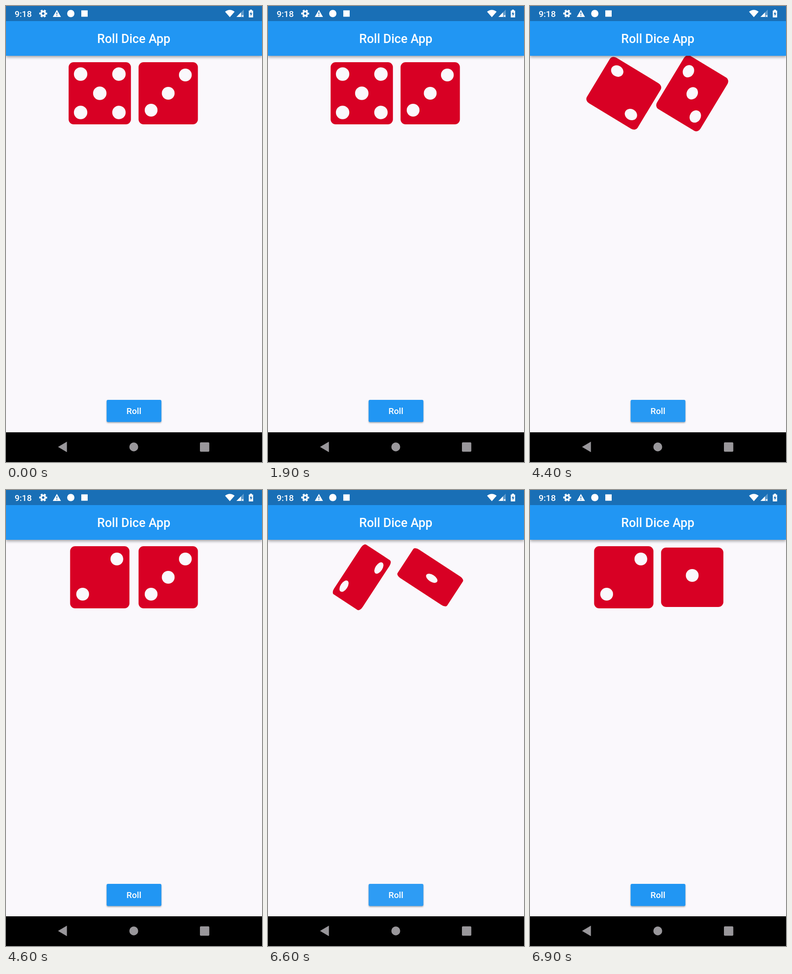
Write an HTML page that moves like this. It is 561 px wide and 998 px high and loops after 8 s.

```html
<!DOCTYPE html>
<html lang="en">
<head>
<meta charset="utf-8">
<title>Roll Dice App</title>
<style>
  html, body { margin: 0; width: 100%; height: 100%; overflow: hidden; background: #faf8fc; }
  svg { display: block; width: 561px; height: 998px; }
  text { font: 500 19px Roboto, sans-serif; fill: #fff; }
  .bar { filter: drop-shadow(0 3px 3px rgba(0, 0, 0, .35)); }
  .button { filter: drop-shadow(0 2px 1.5px rgba(0, 0, 0, .3)); }
</style>
</head>
<body>
<svg viewBox="0 0 561 998">
  <rect width="561" height="998" fill="#faf8fc"/>
  <g id="left"></g>
  <g id="right"></g>

  <rect class="bar" y="33" width="561" height="76" fill="#2196f3"/>
  <rect width="561" height="33" fill="#196fb6"/>
  <text x="280" y="81" text-anchor="middle" style="font-size:27px">Roll Dice App</text>

  <!-- status bar -->
  <text x="19" y="24">9:18</text>
  <g fill="#fff">
    <g transform="translate(81.5 16.5)">
      <circle r="4.6" fill="none" stroke="#fff" stroke-width="3.6"/>
      <circle r="7.4" fill="none" stroke="#fff" stroke-width="2.6" stroke-dasharray="4.2 3.55" stroke-dashoffset="2.1"/>
    </g>
    <path d="M111.5 8.5L120.5 24H102.5z"/>
    <path d="M111.5 13.5v5M111.5 20v2" stroke="#196fb6" stroke-width="1.8"/>
    <circle cx="142" cy="16.5" r="8"/>
    <rect x="165" y="9.5" width="14" height="14"/>
    <path d="M480 12.5Q490.500 4.500 501 12.500L490.500 24.500z"/>
    <path d="M505 24L521 8V24z" opacity=".3"/>
    <path d="M505 24L515 14V24z"/>
    <path d="M516.500 20l4 4m0-4l-4 4" stroke="#fff" stroke-width="1.300"/>
    <path d="M532 10h2.500V8h4.500v2h2.500v15H532z"/>
    <path d="M537.500 12l-3.500 6h2.300v4.500l3.500-6.500h-2.300z" fill="#196fb6"/>
  </g>

  <rect class="button" x="220.500" y="862" width="120" height="48.500" rx="3" fill="#2196f3"/>
  <rect id="press" x="220.500" y="862" width="120" height="48.500" rx="3" fill="#fff"/>
  <text x="280.300" y="893" text-anchor="middle">Roll</text>

  <!-- navigation bar -->
  <rect y="933" width="561" height="65"/>
  <g fill="#99979b">
    <path d="M114 965L133.500 953.500V976.500z"/>
    <circle cx="280" cy="965" r="9.700"/>
    <rect x="425" y="955" width="20.500" height="20.500" rx="2"/>
  </g>
</svg>
<script>
const byId = id => document.getElementById(id);
const LOOP = 8000, STEP = 100;
const diagonal = [[37.5, -40], [-37.5, 37]];
const faces = {
  1: { w: 136.5, h: 130, r: 14, pips: [[0, -4]] },
  2: { w: 130, h: 136, r: 14, pips: diagonal },
  3: { w: 130, h: 136, r: 14, pips: [...diagonal, [0, 0]] },
  5: { w: 136.5, h: 136, r: 14.7, pips: [[-42, -42], [42, -42], [0, 0], [-42, 42], [42, 42]] }
};
const rolls = [
  { start: 0, length: 0, left: 5, right: 3 },
  { start: 4224, length: 300, left: 2, right: 3 },
  { start: 6510, length: 263, left: 2, right: 1 }
];

function drawDie(id, value, x, angle, flipX, flipY) {
  const { w, h, r, pips } = faces[value];
  const die = byId(id);
  die.setAttribute('transform', `translate(${x} 191) rotate(${angle}) scale(${flipX} ${flipY})`);
  die.innerHTML = `<rect x="${-w / 2}" y="${-h / 2}" width="${w}" height="${h}" rx="11" fill="#d80024"/>` +
    pips.map(([px, py]) => `<circle cx="${px}" cy="${py}" r="${r}" fill="#faf8fc"/>`).join('');
}

function draw(now) {
  // The screen refreshes ten times a second.
  const t = Math.floor(now % LOOP / STEP) * STEP;
  const roll = rolls.findLast(({ start }) => t >= start);
  const age = t - roll.start;
  const angle = age < roll.length ? 360 * age / roll.length : 0;
  const flip = Math.cos(angle * Math.PI / 180);
  // One die tips about its horizontal axis, the other about its vertical axis.
  drawDie('left', roll.left, 205.5, angle, 1, flip);
  drawDie('right', roll.right, 355.5, angle, flip, 1);
  byId('press').setAttribute('opacity', roll.length ? Math.max(0, .09 * (1 - age / 250)) : 0);
  requestAnimationFrame(() => draw(performance.now()));
}
draw(0);
</script>
</body>
</html>
```
